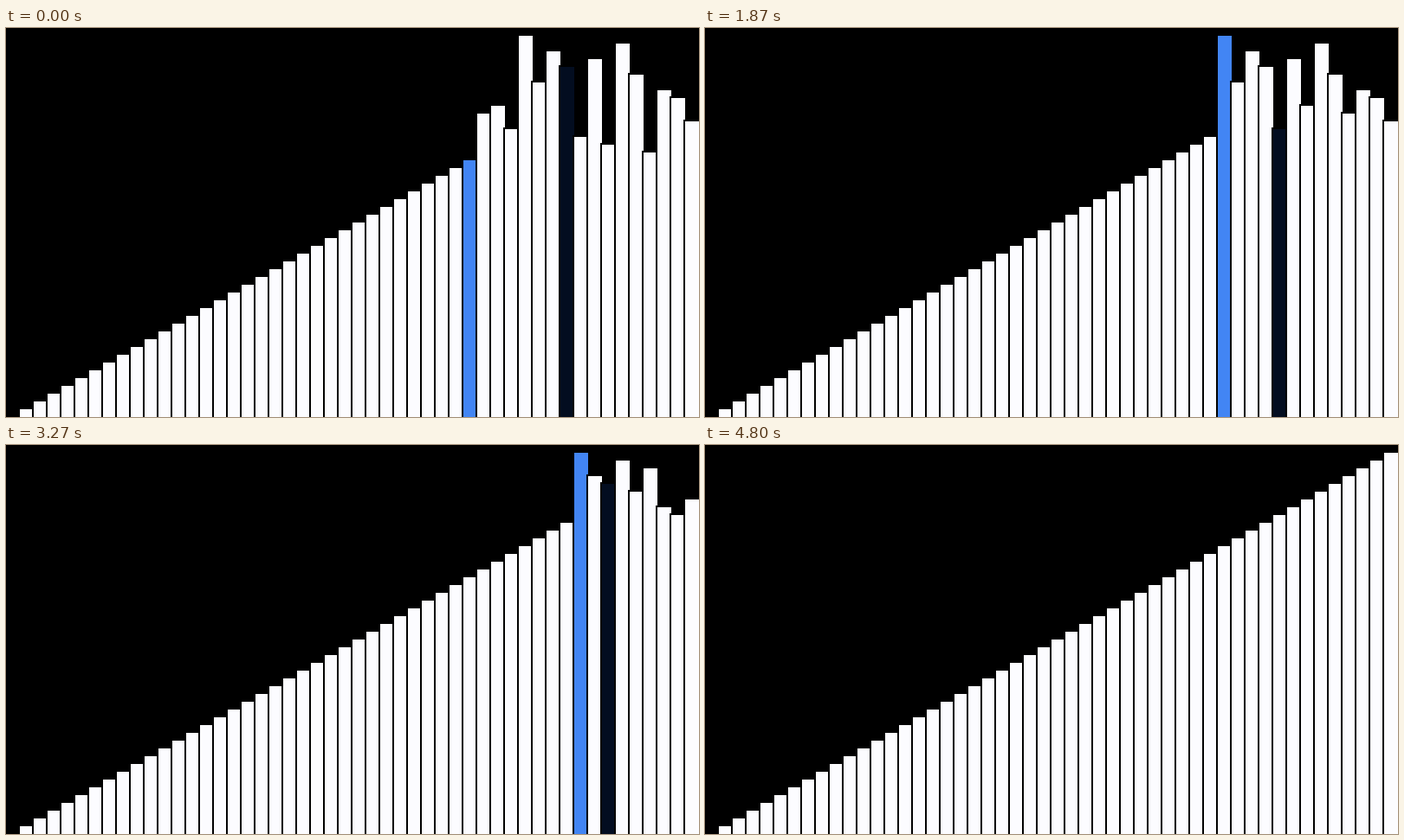
A matplotlib script for the animation above (5.79 s loop, 800 px wide and 450 px high).

```python
import matplotlib.pyplot as plt
from matplotlib.animation import FuncAnimation
from matplotlib.collections import PolyCollection

W, H = 800, 450
N, BAR_W, UNIT, EDGE = 50, 16, 9, 2
LOOP, INTERVAL = 5790, 30
FPS = 15             # rate at which the picture updates
TICKS = 2.1          # sorting steps per update
PHASE = 0.5
START = (33, 40)     # first position of the outer and inner index

BLACK, WHITE = "#000000", "#fcfcff"
CURRENT, SCAN = "#4285f4", "#030d20"

UNSORTED = [39, 40, 37, 49, 43, 47, 45, 36, 46, 35, 48, 44, 34, 42, 41, 38]


def selection_sort(values):
    """List every step as (values, current index, scanned index)."""
    a, steps = list(values), []
    for i in range(START[0], N):
        low = i
        first = START[1] if i == START[0] else i
        for j in range(first, N):
            steps.append((a[:], i, j))
        for j in range(i, N):
            if a[j] < a[low]:
                low = j
        a[i], a[low] = a[low], a[i]
    steps += [steps[-1]] * 3        # rest on the last bar
    steps.append((a[:], None, None))
    return steps


def box(x0, y0, x1, y1):
    return [(x0, y0), (x1, y0), (x1, y1), (x0, y1)]


def bar(i, value):
    """Black outline box and the fill on top of it."""
    x, top = i * BAR_W, H - value * UNIT
    outline = box(x - EDGE, top - EDGE, x + BAR_W + EDGE, H)
    return [outline, box(x, top, x + BAR_W, H)]


def bar_color(k, i, j):
    if k == i:
        return CURRENT
    return SCAN if k == j else WHITE


steps = selection_sort(list(range(START[0] + 1)) + UNSORTED)

fig = plt.figure(figsize=(W / 100, H / 100), dpi=100, facecolor=BLACK)
ax = fig.add_axes([0, 0, 1, 1])
ax.set_xlim(0, W)
ax.set_ylim(H, 0)
ax.axis("off")
bars = PolyCollection([], linewidths=0, antialiaseds=False)
ax.add_collection(bars, autolim=False)


def update(frame):
    t = (frame + 0.5) * INTERVAL
    tick = int(int(t * FPS / 1000) * TICKS + PHASE)
    values, i, j = steps[min(tick, len(steps) - 1)]
    verts, colors = [], []
    for k, v in enumerate(values):
        if v:
            verts += bar(k, v)
            colors += [BLACK, bar_color(k, i, j)]
    bars.set_verts(verts)
    bars.set_facecolor(colors)
    return [bars]


anim = FuncAnimation(fig, update, frames=LOOP // INTERVAL, interval=INTERVAL,
                     repeat=True, repeat_delay=0, blit=False)
plt.show()
```
